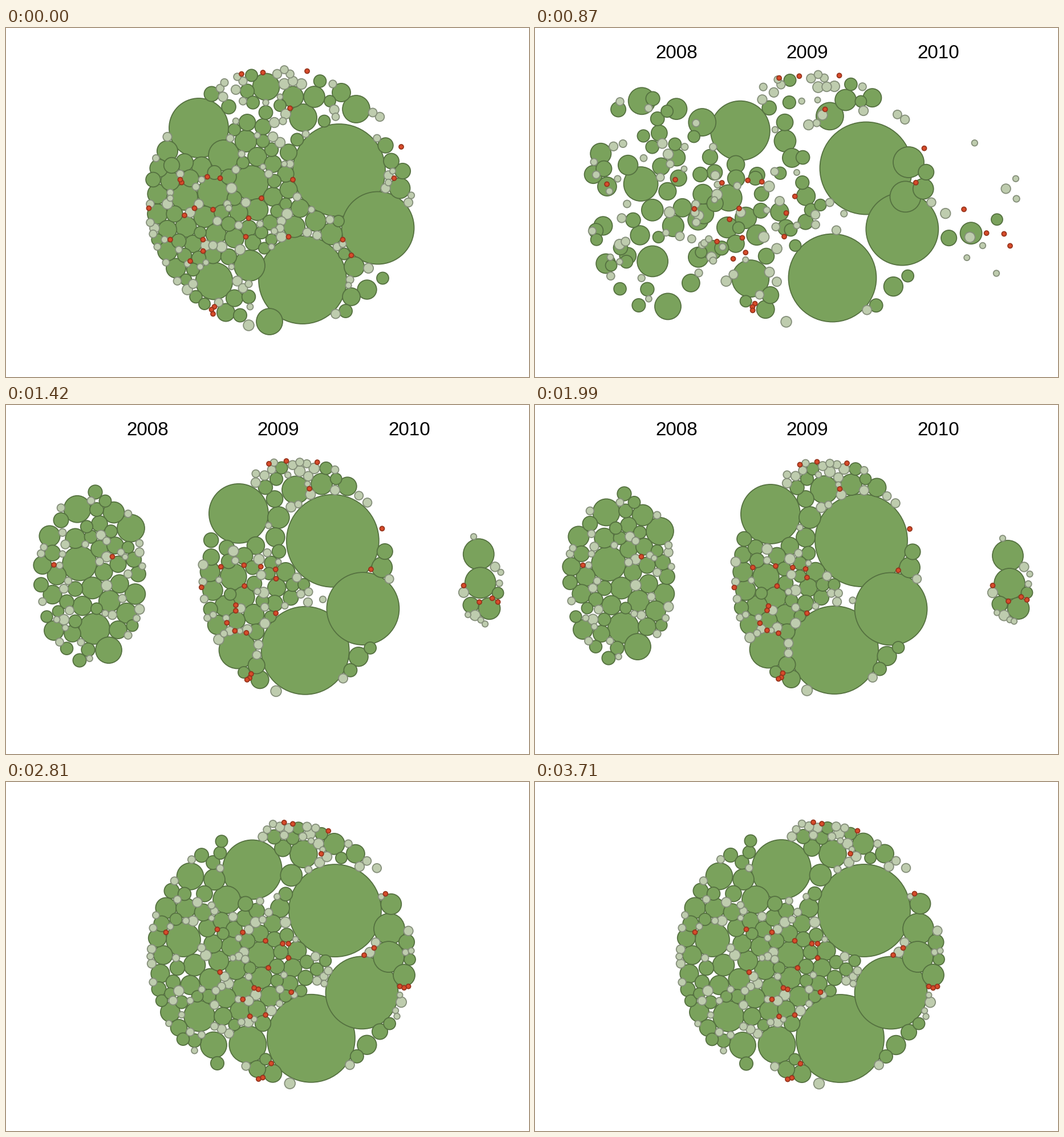
A matplotlib script that plays this animation: 917 by 611 pixels, repeating every 3.81 s.

```python
import numpy as np
import matplotlib.pyplot as plt
from matplotlib.animation import FuncAnimation
from matplotlib.collections import EllipseCollection

W, H, DPI = 917, 611, 100
STEP, LOOP = 30, 3810
SPLIT, MERGE, SQUEEZE = 640, 2230, 2310
GREEN, PALE, RED = (122, 162, 92), (190, 204, 174), (216, 75, 42)
DISC = (482, 302, 234, 234)
rng = np.random.default_rng(8)

# Largest bubbles: radius, then x y when mixed, split and merged
LARGE = np.array([
    (81, 584, 249, 572, 237, 577, 225), (77, 520, 441, 525, 429, 535, 449),
    (63.5, 652, 350, 624, 357, 624, 369), (52, 338, 175, 413, 191, 432, 153),
    (32.5, 365, 443, 409, 428, 424, 460), (30, 430, 271, 129, 278, 311, 276),
    (27, 427, 416, 155, 390, 339, 410), (27, 382, 223, 829, 264, 672, 257),
    (27, 363, 288, 832, 313, 671, 306), (24, 614, 142, 219, 221, 387, 206),
    (24, 521, 157, 507, 148, 522, 126), (23.5, 456, 103, 125, 188, 323, 165),
    (23, 462, 514, 180, 423, 364, 461), (23, 313, 296, 405, 301, 448, 302),
])
# Per year: outline, counts of green, pale and red,
# then new centre x, x scale and y scale when mixed and when merged
YEARS = [
    ((147, 300, 98, 157), (42, 37, 2), (430, 2.2, 1.35), (331, 0.95, 1.2)),
    ((511, 302, 164, 210), (47, 55, 22), (476, 1.45, 1.1), (532, 0.95, 1.15)),
    ((833, 300, 38, 84), (3, 9, 4), (500, 4, 1.5), (681, 1, 1.3)),
]


def free_space(fixed, outline):
    """Grid points in the outline and the room left around each."""
    cx, cy, rx, ry = outline
    px, py = np.meshgrid(np.arange(cx - rx, cx + rx, 2.5), np.arange(cy - ry, cy + ry, 2.5))
    reach = np.hypot((px - cx) / rx, (py - cy) / ry) + 1e-6
    inside = reach < 1
    px, py, reach = px[inside], py[inside], reach[inside]
    room = np.hypot(px - cx, py - cy) * (1 / reach - 1)
    for r, x, y in fixed:
        room = np.minimum(room, np.hypot(px - x, py - y) - r)
    return px, py, room


def fill(fixed, radii, outline, hints=None):
    """Pack small circles snugly into free gaps close to their hints."""
    px, py, room = free_space(fixed, outline)
    if hints is None:
        pick = rng.choice(np.flatnonzero(room > 3), len(radii))
        hints = np.column_stack([px[pick], py[pick]])
    spots = np.zeros((len(radii), 2))
    for k in np.argsort(-radii):
        gap = room - radii[k]
        cost = np.hypot(px - hints[k, 0], py - hints[k, 1]) / 100
        cost = cost + 0.06 * np.maximum(gap, 0) + 0.25 * np.maximum(-gap - 2, 0)
        i = np.argmin(cost)
        spots[k] = px[i], py[i]
        room = np.minimum(room, np.hypot(px - px[i], py - py[i]) - radii[k])
    return spots


def moved(spots, outline, target):
    (cx, cy), (ox, sx, sy) = outline[:2], target
    return np.column_stack([ox + sx * (spots[:, 0] - cx), cy + sy * (spots[:, 1] - cy)])


def year_of(x):
    return np.where(x < 300, 0, np.where(x > 750, 2, 1))


def build():
    large_year = year_of(LARGE[:, 3])
    colors = [GREEN] * len(LARGE)
    radii, split, mix_hints, merge_hints = [], [], [], []
    for k, (outline, (greens, pales, reds), mix, merge) in enumerate(YEARS):
        r = np.r_[10 + 9 * np.linspace(0, 1, greens) ** 1.3,
                  rng.uniform(5, 9.5, pales), np.full(reds, 4)]
        spots = fill(LARGE[large_year == k][:, [0, 3, 4]], r, outline)
        radii.append(r)
        split.append(spots)
        mix_hints.append(moved(spots, outline, mix))
        merge_hints.append(moved(spots, outline, merge))
        colors += [GREEN] * greens + [PALE] * pales + [RED] * reds
    small = np.concatenate(radii)
    mixed = fill(LARGE[:, :3], small, DISC, np.vstack(mix_hints))
    merged = fill(LARGE[:, [0, 5, 6]], small, DISC, np.vstack(merge_hints))

    r = np.r_[LARGE[:, 0], small]
    poses = [np.vstack([LARGE[:, 1:3], mixed]),
             np.vstack([LARGE[:, 3:5], np.vstack(split)]),
             np.vstack([LARGE[:, 5:7], merged])]
    order = np.argsort(-r, kind="stable")
    return r[order], [p[order] for p in poses], np.array(colors)[order] / 255


def ease(t, span):
    return 1 - np.exp(-(np.maximum(t, 0) / span) ** 1.7)


R, (MIXED, APART, MERGED), FILL = build()
YEAR = year_of(APART[:, 0])
SPAN = np.choose(YEAR, [170 + 0 * R, 430 + 0 * R, 130 + 4 * R])


def places(t):
    squeeze = ease(t - SQUEEZE, 200)
    out_x, out_y = ease(t - SPLIT, SPAN), ease(t - SPLIT, 430)
    in_x = np.where(YEAR == 1, squeeze, ease(t - MERGE, 140))
    out, back = APART - MIXED, MERGED - APART
    return np.column_stack([
        MIXED[:, 0] + out[:, 0] * out_x + back[:, 0] * in_x,
        MIXED[:, 1] + out[:, 1] * out_y + back[:, 1] * squeeze,
    ])


fig = plt.figure(figsize=(W / DPI, H / DPI), dpi=DPI, facecolor="white")
ax = fig.add_axes([0, 0, 1, 1])
ax.set_xlim(0, W)
ax.set_ylim(H, 0)
ax.axis("off")

bubbles = EllipseCollection(
    2 * R, 2 * R, np.zeros(len(R)), units="xy", offsets=MIXED, offset_transform=ax.transData,
    facecolors=FILL, edgecolors=FILL * 0.7, linewidths=1.8 * 72 / DPI)
ax.add_collection(bubbles, autolim=False)
labels = [
    ax.text(477.5 + 229.2 * k, 53, str(2009 + k), fontsize=33.3 * 72 / DPI,
            family="Liberation Sans", color="black", ha="center", va="baseline", visible=False)
    for k in (-1, 0, 1)
]


def draw(n):
    t = n * STEP
    bubbles.set_offsets(places(t))
    for label in labels:
        label.set_visible(SPLIT <= t < MERGE)
    return [bubbles, *labels]


anim = FuncAnimation(fig, draw, frames=LOOP // STEP, interval=STEP, repeat=True, repeat_delay=0)
plt.show()
```
